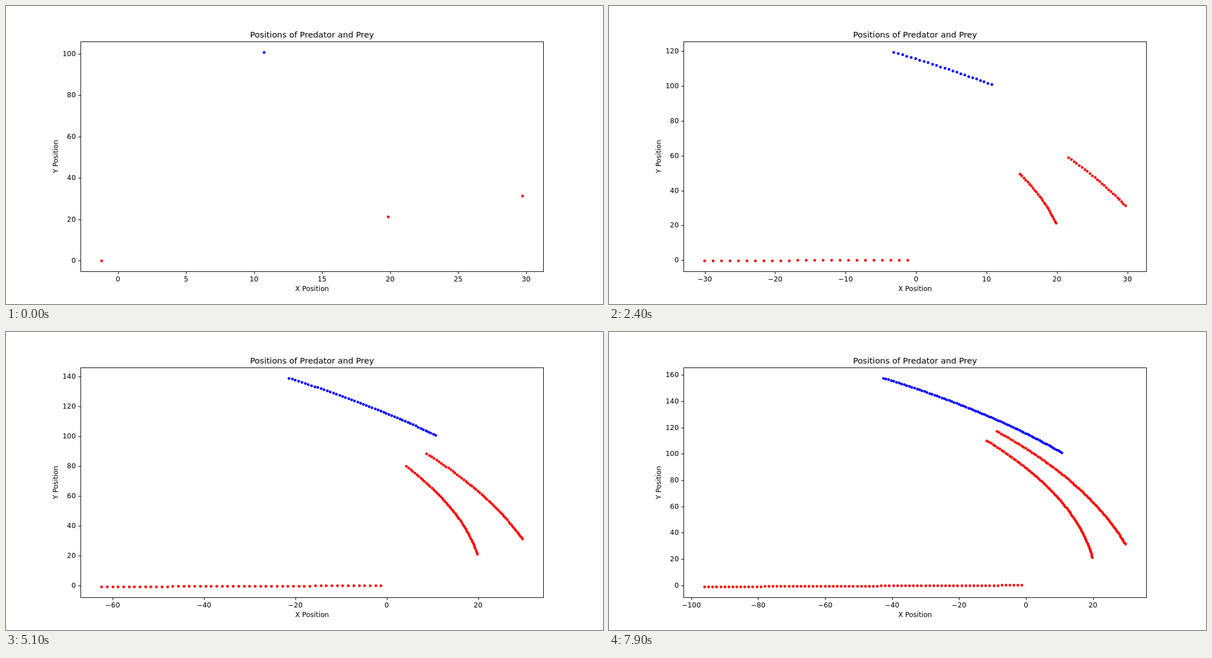
Write an HTML page that moves like this. It is 1058 by 529 pixels and loops after 8000 ms.

```html
<!DOCTYPE html>
<html lang="en">
<head>
<meta charset="utf-8">
<title>Positions of Predator and Prey</title>
<style>
  html, body { margin: 0; width: 100%; height: 100%; overflow: hidden; background: #fff; }
  svg { display: block; width: 100%; height: 100%; }
  text { font: 12.25px "DejaVu Sans", sans-serif; fill: #000; text-anchor: middle; }
  .title { font-size: 14.7px; }
  #ylabels text { text-anchor: end; }
  .line { fill: none; stroke: #000; stroke-width: 1; }
</style>
</head>
<body>
<svg viewBox="0 0 1058 529">
  <rect width="1058" height="529" fill="#fff"/>
  <g id="dots"></g>
  <path id="ticks" class="line"/>
  <rect class="line" x="132.5" y="63.5" width="820" height="408"/>
  <g id="xlabels"></g>
  <g id="ylabels"></g>
  <text class="title" x="542.4" y="56">Positions of Predator and Prey</text>
  <text x="542.4" y="506">X Position</text>
  <text transform="translate(92 267.2) rotate(-90)">Y Position</text>
</svg>
<script>
const LOOP = 8000, STEP = 100;
const BOX = { left: 132.3, right: 952.56, top: 63.48, bottom: 471 };
const $ = id => document.getElementById(id);

// Coordinate after u steps: start plus a cubic with the given coefficients.
const cubic = (start, a, b, c) => u => start + u * (a + u * (b + u * c));

const tracks = [
  { color: '#f00', x: cubic(-1.2, -1.2, 0, 0), y: cubic(-0.0145, -0.0145, 0, 0) },
  { color: '#f00', x: cubic(19.87, -0.133, -0.00338, 0), y: cubic(21.18, 1.195, -0.0007, -2.6e-6) },
  { color: '#f00', x: cubic(29.73, -0.2722, -0.00271, 0), y: cubic(31.17, 1.172, -0.00085, -2.8e-6) },
  { color: '#00f', x: cubic(10.73, -0.5273, -0.002305, 5.5e-6), y: cubic(100.68, 0.7912, -0.0005, -5.2e-6) }
];

// Axis with a 5% margin around the data and at most nine tick intervals.
function makeAxis(min, max, from, to) {
  const pad = (max - min) * 0.05;
  const lo = min - pad, hi = max + pad;
  const raw = (hi - lo) / 9;
  const power = 10 ** Math.floor(Math.log10(raw));
  const step = power * [1, 2, 2.5, 5, 10].find(s => s * power >= raw);
  const ticks = [];
  for (let i = Math.ceil(lo / step); i * step <= hi; i++) ticks.push(i * step);
  return { ticks, map: v => from + (v - lo) / (hi - lo) * (to - from) };
}

const snap = v => Math.floor(v) + 0.5;
const label = (v, x, y) =>
  `<text x="${x}" y="${y}">${v < 0 ? '\u2212' : ''}${Math.abs(v)}</text>`;

function draw(count) {
  const last = count - 1;
  const ax = makeAxis(tracks[0].x(last), tracks[2].x(0), BOX.left, BOX.right);
  const ay = makeAxis(tracks[0].y(last), tracks[3].y(last), BOX.bottom, BOX.top);

  let dots = '', lines = '', xs = '', ys = '';
  for (const { color, x, y } of tracks) {
    for (let u = 0; u < count; u++) {
      dots += `<circle cx="${snap(ax.map(x(u)))}" cy="${snap(ay.map(y(u)))}" r="2.45" fill="${color}"/>`;
    }
  }
  for (const v of ax.ticks) {
    const x = ax.map(v);
    lines += `M${Math.round(x) + 0.5} 471.5v4.3`;
    xs += label(v, x.toFixed(2), 489);
  }
  for (const v of ay.ticks) {
    const y = Math.round(ay.map(v));
    lines += `M132.5 ${y + 0.5}h-4.3`;
    ys += label(v, 123.7, y + 4);
  }
  $('dots').innerHTML = dots;
  $('ticks').setAttribute('d', lines);
  $('xlabels').innerHTML = xs;
  $('ylabels').innerHTML = ys;
}

const start = performance.now();
let shown = 0;
function tick() {
  const count = Math.floor((performance.now() - start) % LOOP / STEP) + 1;
  if (count !== shown) draw(shown = count);
  requestAnimationFrame(tick);
}
tick();
</script>
</body>
</html>
```
